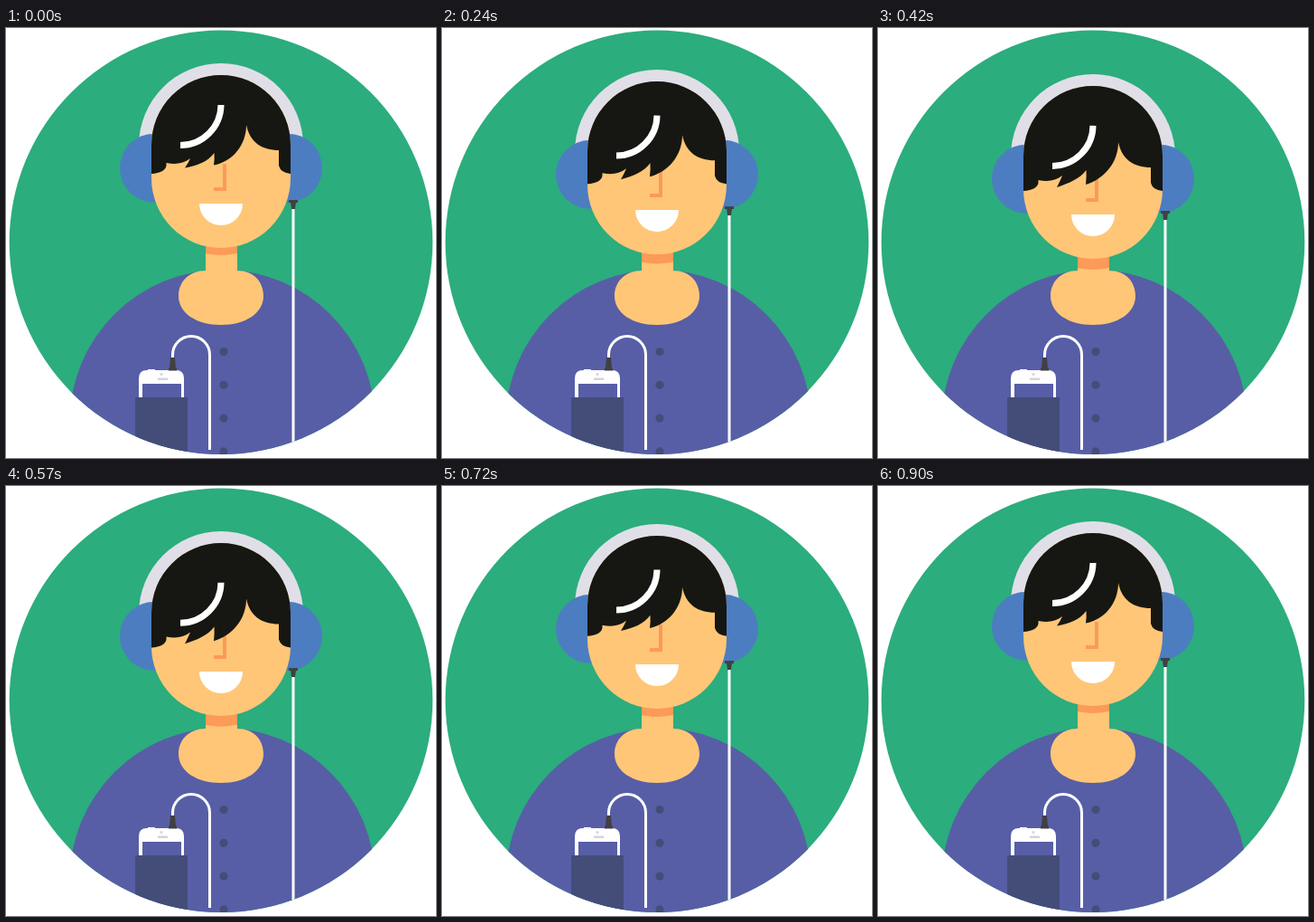
An HTML page with a canvas that plays this animation: 476 by 475 pixels, repeating every 930 ms.

```html
<!DOCTYPE html>
<html lang="en">
<head>
<meta charset="utf-8">
<title>Listening to music</title>
<style>
  html, body { margin: 0; width: 100%; height: 100%; overflow: hidden; background: #fff; }
  canvas { display: block; }
</style>
</head>
<body>
<canvas id="stage" width="476" height="475"></canvas>
<script>
const ctx = document.getElementById('stage').getContext('2d');
const LOOP = 930, STEP = 30, HALF = 450;
const GREEN = '#2bad7d', SHIRT = '#575ea6', NAVY = '#444d78', SKIN = '#ffc677',
      SHADE = '#fc9a57', HAIR = '#161712', BAND = '#e0dfe8', PAD = '#4c7dc1', PLUG = '#414042';

const easeInOut = p => p < 0.5 ? 4 * p ** 3 : 1 - 4 * (1 - p) ** 3;

// Eased dip that goes down for HALF ms and returns, starting after a delay.
function dip(time, delay = 0) {
  const away = Math.abs(time - delay - HALF) / HALF;
  return easeInOut(Math.max(0, 1 - away));
}

function rect(color, x, y, w, h) {
  ctx.fillStyle = color;
  ctx.fillRect(x, y, w, h);
}

function fillPath(color, data) {
  ctx.fillStyle = color;
  ctx.fill(new Path2D(data));
}

function strokePath(color, width, data) {
  ctx.strokeStyle = color;
  ctx.lineWidth = width;
  ctx.stroke(new Path2D(data));
}

function ellipse(color, x, y, rx, ry = rx) {
  ctx.fillStyle = color;
  ctx.beginPath();
  ctx.ellipse(x, y, rx, ry, 0, 0, Math.PI * 2);
  ctx.fill();
}

function shifted(dy, draw) {
  ctx.save();
  ctx.translate(0, dy);
  draw();
  ctx.restore();
}

function drawBody(shadowDrop) {
  ellipse(SHIRT, 239.5, 435, 169, 168);
  fillPath(SKIN, 'M221 230H256V268C274 268 285 280 285 296C285 315 265 328 238 328C211 328 191 315 191 296C191 280 203 268 221 268Z');
  ctx.save();
  ctx.beginPath();
  ctx.rect(221, 225, 35, 50);
  ctx.clip();
  ellipse(SHADE, 238, 174 + shadowDrop, 77);
  ctx.restore();
  for (let i = 0; i < 4; i++) ellipse(NAVY, 241, 357.5 + i * 36.8, 4.6);
}

function drawPhone() {
  fillPath('#fff', 'M147 410V387Q147 378 156 378H188Q197 378 197 387V410Z');
  rect('#fff', 157, 377, 8, 2);
  rect(SHIRT, 151, 393, 43, 16);
  ellipse('#d3d3dc', 172, 382.5, 1.5);
  rect('#d3d3dc', 168, 386.5, 11, 2.5);
  rect(NAVY, 143, 408, 58, 67);
  strokePath('#fff', 3, 'M184.5 365V361A20.5 20.5 0 0 1 225.5 361V466');
  fillPath(PLUG, 'M182 364H187L188 376H181Z');
  rect(PLUG, 180, 375.5, 9, 3);
}

function drawHead() {
  ellipse(BAND, 238, 130, 91);
  ellipse(PAD, 164, 154.7, 38);
  ellipse(PAD, 312, 154.7, 38);
  fillPath(SKIN, 'M161 129A77 77 0 0 1 315 129V166A77 77 0 0 1 161 166Z');
  strokePath(SHADE, 4, 'M242 150V178H230');
  fillPath('#fff', 'M214 194H262A24 24 0 0 1 214 194Z');
}

// The crown stays with the head while the fringe hangs lower.
function drawHair(drop, tipDrop) {
  const y = v => v + drop, tip = v => v + tipDrop;
  fillPath(HAIR, `M161 129A77 77 0 0 1 315 129V${y(161)}
    Q304 ${y(160)} 302 ${y(152)}V${y(135)}
    C283 ${y(135)} 270 ${y(126)} 266 ${y(107)}
    C266 ${y(130)} 250 ${y(148)} 230 ${tip(151.5)}
    Q231 ${y(145)} 230.5 ${y(138)}
    C223 ${y(148)} 212 ${y(152)} 198 ${tip(154.5)}
    Q202 ${y(149)} 204 ${y(144)}
    C196 ${y(150)} 188 ${y(151)} 177.5 ${y(149)}
    V${y(152)}Q176 ${y(160)} 161 ${y(161)}Z`);
}

function drawCord(drop) {
  strokePath('#fff', 3, `M318 ${198 + drop}V475`);
  shifted(drop, () => {
    rect(PLUG, 313, 190, 10, 3);
    fillPath(PLUG, 'M315 192H321L320 200H316Z');
  });
}

function draw(time) {
  const nod = dip(time), lag = dip(time, 30);
  const headDrop = 12 * nod;
  ctx.clearRect(0, 0, 476, 475);
  ctx.save();
  ctx.beginPath();
  ctx.arc(238, 236.7, 234.3, 0, Math.PI * 2);
  ctx.clip();
  rect(GREEN, 0, 0, 476, 475);
  drawBody(16 * nod);
  drawPhone();
  shifted(headDrop, () => {
    drawHead();
    drawHair(7 * nod, 9.5 * nod);
    shifted(11 * lag, () => strokePath('#fff', 7, 'M238 85A45 45 0 0 1 193 129.5'));
  });
  drawCord(headDrop);
  ctx.restore();
}

function tick() {
  const time = performance.now() % LOOP;
  draw(Math.floor(time / STEP) * STEP);
  requestAnimationFrame(tick);
}
tick();
</script>
</body>
</html>
```
